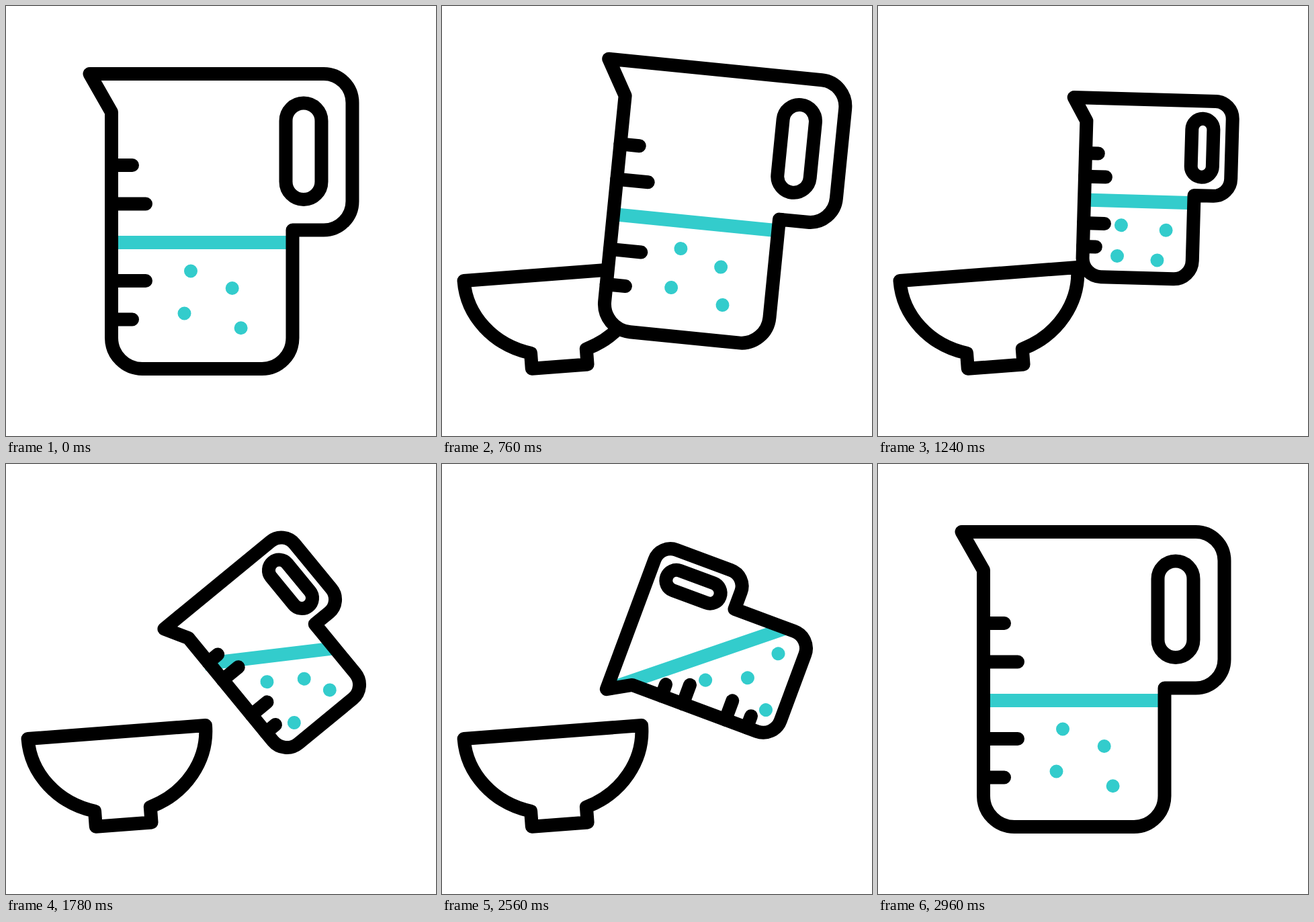
Write an HTML page that moves like this. It is 640 px wide and 640 px high and loops after 3600 ms.

```html
<!DOCTYPE html>
<html lang="en">
<head>
<meta charset="utf-8">
<title>Measuring jug</title>
<style>
  html, body { margin: 0; width: 100%; height: 100%; overflow: hidden; background: #fff; }
  svg { display: block; width: 100%; height: 100%; }
  path {
    fill: none; stroke: #000; stroke-width: 20;
    stroke-linecap: round; stroke-linejoin: round;
    vector-effect: non-scaling-stroke;
  }
  #body { fill: #fff; stroke: none; }
  .water { stroke: #33cccc; }
  #level { stroke-linecap: butt; }
</style>
</head>
<body>
<svg viewBox="0 0 640 640">
  <path id="bowl" d="M-132.6 0H132.6A132.6 121 0 0 1 41.5 115V138H-41.5V115A132.6 121 0 0 1 -132.6 0Z"/>
  <g id="jug">
    <path id="body"/>
    <path id="level" class="water"/>
    <path id="dots" class="water"/>
    <path id="outline" d="M124.5 101H473A42.5 43 0 0 1 515.5 144V290A42.5 43 0 0 1 473 333.5H426.5V494A45.5 46 0 0 1 381 540H203A46 46 0 0 1 157 494V158Z"/>
    <path d="M416.5 171A26.5 26.5 0 0 1 469.5 171V261.5A26.5 26.5 0 0 1 416.5 261.5Z"/>
    <path d="M157 237H188M157 294.5H208M157 409H208M157 466.5H188"/>
  </g>
</svg>
<script>
  const LOOP = 3600;
  const el = id => document.getElementById(id);
  const [bowl, jug, level, dots] = ['bowl', 'jug', 'level', 'dots'].map(el);
  el('body').setAttribute('d', el('outline').getAttribute('d'));

  // Each dot: its place in the full-size, small and pouring jug.
  const places = [
    [[275, 394.5], [248, 412.5], [233, 327]],
    [[336.7, 420], [361, 421], [275.4, 424.8]],
    [[265.5, 457.5], [240.5, 489], [215.5, 496]],
    [[349.6, 479.3], [339.6, 496], [359.6, 476]]
  ];

  const mix = (a, b, k) => a + (b - a) * k;

  // Eased progress from 0 to 1 between two times.
  function phase(t, from, to) {
    const u = Math.min(1, Math.max(0, (t - from) / (to - from)));
    return u * u * (3 - 2 * u);
  }

  function draw(t) {
    const stay = 1 - phase(t, 2550, 2945);
    const hold = 1 - phase(t, 2555, 2960);

    const x = mix(320, 406.3, phase(t, 0, 590) * stay);
    const y = mix(320, 272, phase(t, 592, 927) * stay);
    const scale = mix(1, 0.589, phase(t, 520, 1341) * stay);
    const lean = 5.74 * phase(t, 0, 720) - 4.4 * phase(t, 720, 1340);
    const turn = (lean - 71 * phase(t, 1375, 2114)) * hold;
    jug.setAttribute('transform',
      `translate(${x} ${y}) rotate(${turn}) scale(${scale}) translate(-320 -320)`);

    const bowlX = mix(292, 164.75, phase(t, 0, 350) * hold);
    bowl.setAttribute('transform', `translate(${bowlX} 399) rotate(-4.33)`);

    const settle = phase(t, 600, 1341);
    const pour = phase(t, 1393, 2163);
    const tilt = pour * hold;
    level.setAttribute('d',
      `M${mix(157, 138, tilt)} ${mix(352, 119, tilt)}L427 ${mix(352, 472, tilt)}`);

    dots.setAttribute('d', places.map(([full, small, poured]) => {
      const [dx, dy] = full.map((c, i) =>
        mix(c, mix(mix(c, small[i], settle), poured[i], pour), hold));
      return `M${dx} ${dy}h.01`;
    }).join(''));
  }

  const start = performance.now();
  function tick() {
    draw((performance.now() - start) % LOOP);
    requestAnimationFrame(tick);
  }
  draw(0);
  requestAnimationFrame(tick);
</script>
</body>
</html>
```
